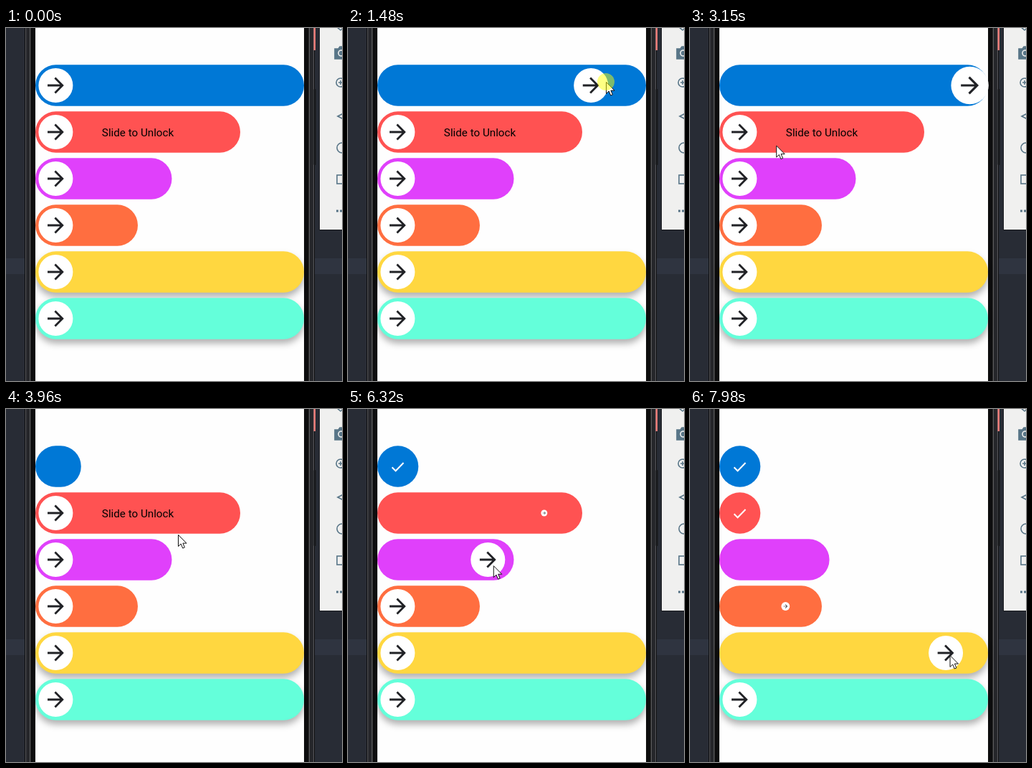
An HTML page that plays this animation: 469x492 px, repeating every 8000 ms.

```html
<!DOCTYPE html>
<html lang="en">
<head>
<meta charset="utf-8">
<title>Slide to act</title>
<style>
  html, body { margin: 0; width: 100%; height: 100%; overflow: hidden; background: #282c35; }
  svg { display: block; width: 469px; height: 492px; }
  .label { font: 15.2px Roboto, Arial, sans-serif; }
  .raised { filter: drop-shadow(0 6px 5px rgba(0, 0, 0, .3)); }
  .tools { fill: none; stroke: #587587; stroke-width: 1.6; }
</style>
</head>
<body>
<svg viewBox="0 0 469 492" xmlns="http://www.w3.org/2000/svg">
  <defs>
    <g id="bezel">
      <rect x="26" width="15" height="492" fill="#0d0d0e"/>
      <rect x="27" width="1.5" height="492" fill="#55565a"/>
      <rect x="28.5" width="4.5" height="492" fill="#25262a"/>
      <rect x="33" width="1.3" height="492" fill="#5c5c5e"/>
    </g>
  </defs>
  <rect width="469" height="492" fill="#282c35"/>
  <rect y="321" width="469" height="22" fill="#2f3440"/>
  <use href="#bezel"/>
  <use href="#bezel" transform="matrix(-1 0 0 1 457 0)"/>
  <rect x="429.5" width="2.5" height="31" fill="#ef7c78"/>
  <rect x="429.5" y="85" width="3" height="106" rx="1" fill="#17181b"/>
  <rect x="41" width="375" height="492" fill="#fefefe"/>

  <rect x="437" width="32" height="282" fill="#17191d"/>
  <rect x="438" width="31" height="281" fill="#f0f0ef"/>
  <g class="tools">
    <path d="M461-2l6 5 6-5"/>
    <path d="M459 29h5l2-3h8v17h-15z" fill="#587587"/>
    <circle cx="468" cy="35" r="4" fill="#587587" stroke="#f0f0ef"/>
    <circle cx="467" cy="76" r="6"/>
    <path d="M464 76h6M467 73v6"/>
    <path d="M473 118l-10 5 10 5"/>
    <circle cx="469" cy="167" r="7"/>
    <rect x="462" y="205" width="13" height="12"/>
    <path d="M461 255h3M466 255h3" stroke-width="3"/>
  </g>

  <g id="sliders"></g>
  <g id="cursor">
    <path d="M.5.5v16l3.7-3.5 2.5 6 2.7-1.1-2.5-5.8h5.1z" fill="#fff" stroke="#111"/>
    <circle id="halo" r="12" fill="#ff0" fill-opacity=".49"/>
  </g>
</svg>

<script>
const LOOP = 8000, LEFT = 41, SIZE = 57.3, KNOB = 24, NS = "http://www.w3.org/2000/svg";
const SHRINK = 335, FOLD = 740, CHECK = 350;

// The knob moves by reach from grab to release, then shrinks, and the bar folds to a disc.
// All times are in ms; grip is the cursor's height on the knob.
const sliders = [
  { color: "#0078d6", width: 375, grab: 928, release: 1790, reach: 319, grip: -5, shrink: 3035, fold: 3370 },
  { color: "#ff5252", width: 286, grab: 4380, release: 5190, reach: 224, grip: 10, shrink: 6000, fold: 6900,
    text: "Slide to Unlock" },
  { color: "#e040fb", width: 190.5, grab: 6020, release: 6370, reach: 129, grip: 8, shrink: 7160, fold: 7952 },
  { color: "#ff6e40", width: 143, grab: 6800, release: 7200, reach: 82, grip: 10, shrink: 7665 },
  { color: "#ffd740", width: 375, grab: 7610, release: 8000, reach: 288.5, grip: 3, raised: true },
  { color: "#64ffda", width: 375, raised: true }
];

const progress = (t, from, span) => Math.min(1, Math.max(0, (t - from) / span || 0));
const outSine = p => Math.sin(p * Math.PI / 2);
const inBack = p => p * p * (2.70158 * p - 1.70158);
const outCirc = p => Math.sqrt(1 - (p - 1) ** 2);
const smooth = p => p * p * (3 - 2 * p);

function add(parent, tag, attrs) {
  const node = document.createElementNS(NS, tag);
  for (const key in attrs) node.setAttribute(key, attrs[key]);
  return parent.appendChild(node);
}

const root = document.getElementById("sliders");
const cursor = document.getElementById("cursor");
const halo = document.getElementById("halo");

// Free cursor moves; each drag adds its own two stops.
const stops = [
  { t: 250, x: 320, y: 470 },
  { t: 2270, x: 82, y: 160 },
  { t: 2650, x: 62, y: 158 },
  { t: 3960, x: 240, y: 175 },
  { t: 5430, x: 120, y: 202 }
];

sliders.forEach((s, i) => {
  s.mid = 80 + 65 * i;
  s.bar = add(root, "rect", { x: LEFT, y: s.mid - SIZE / 2, height: SIZE, rx: SIZE / 2, fill: s.color });
  if (s.raised) s.bar.setAttribute("class", "raised");
  if (s.text) {
    s.label = add(root, "text", { x: 184, y: s.mid + 5.8, "text-anchor": "middle", class: "label" });
    s.label.textContent = s.text;
  }
  s.knob = add(root, "g", {});
  add(s.knob, "circle", { cx: KNOB, r: KNOB, fill: "#fff" });
  add(s.knob, "path", {
    d: "M12 4l-1.41 1.41L16.17 11H4v2h12.17l-5.58 5.59L12 20l8-8z",
    fill: "#212226", transform: `translate(${KNOB - 17.1} -17.1) scale(1.425)`
  });
  if (s.fold) {
    const clip = add(root, "clipPath", { id: "clip" + i });
    s.wipe = add(clip, "rect", { x: 59, y: s.mid - 12, height: 24 });
    add(root, "path", {
      d: `M61.5 ${s.mid + 1.3}l5 5L77.5 ${s.mid - 5}`, fill: "none", stroke: "#fff",
      "stroke-width": 2, "clip-path": `url(#clip${i})`
    });
  }
  if (s.reach) {
    const y = s.mid + s.grip;
    stops.push({ t: s.grab - 50, x: 74, y, press: true }, { t: s.release - 60, x: 74 + s.reach, y });
  }
});
stops.sort((a, b) => a.t - b.t);

function drawCursor(t) {
  const next = stops.findIndex(s => s.t > t);
  const b = stops[next < 0 ? stops.length - 1 : next];
  const a = next < 0 ? b : stops[Math.max(0, next - 1)];
  const p = (a.press ? outSine : smooth)(progress(t, a.t, b.t - a.t));
  cursor.setAttribute("visibility", next ? "visible" : "hidden");
  cursor.setAttribute("transform", `translate(${a.x + (b.x - a.x) * p} ${a.y + (b.y - a.y) * p})`);
  halo.setAttribute("opacity", a.press ? 1 : 0);
}

function drawSlider(s, t) {
  const drag = s.reach ? outSine(progress(t, s.grab, s.release - s.grab)) : 0;
  const scale = Math.max(0, 1 - inBack(progress(t, s.shrink, SHRINK)));
  const fold = outCirc(progress(t, s.fold, FOLD));
  const x = LEFT + 4.4 + drag * (s.reach || 0);
  s.bar.setAttribute("width", s.width - (s.width - SIZE) * fold);
  s.knob.setAttribute("transform", `translate(${x} ${s.mid}) scale(${scale})`);
  if (s.label) s.label.setAttribute("opacity", 1 - drag);
  if (s.wipe) s.wipe.setAttribute("width", 21 * progress(t, s.fold + FOLD, CHECK));
}

const start = performance.now();
function tick() {
  const t = (performance.now() - start) % LOOP;
  sliders.forEach(s => drawSlider(s, t));
  drawCursor(t);
  requestAnimationFrame(tick);
}
tick();
</script>
</body>
</html>
```
